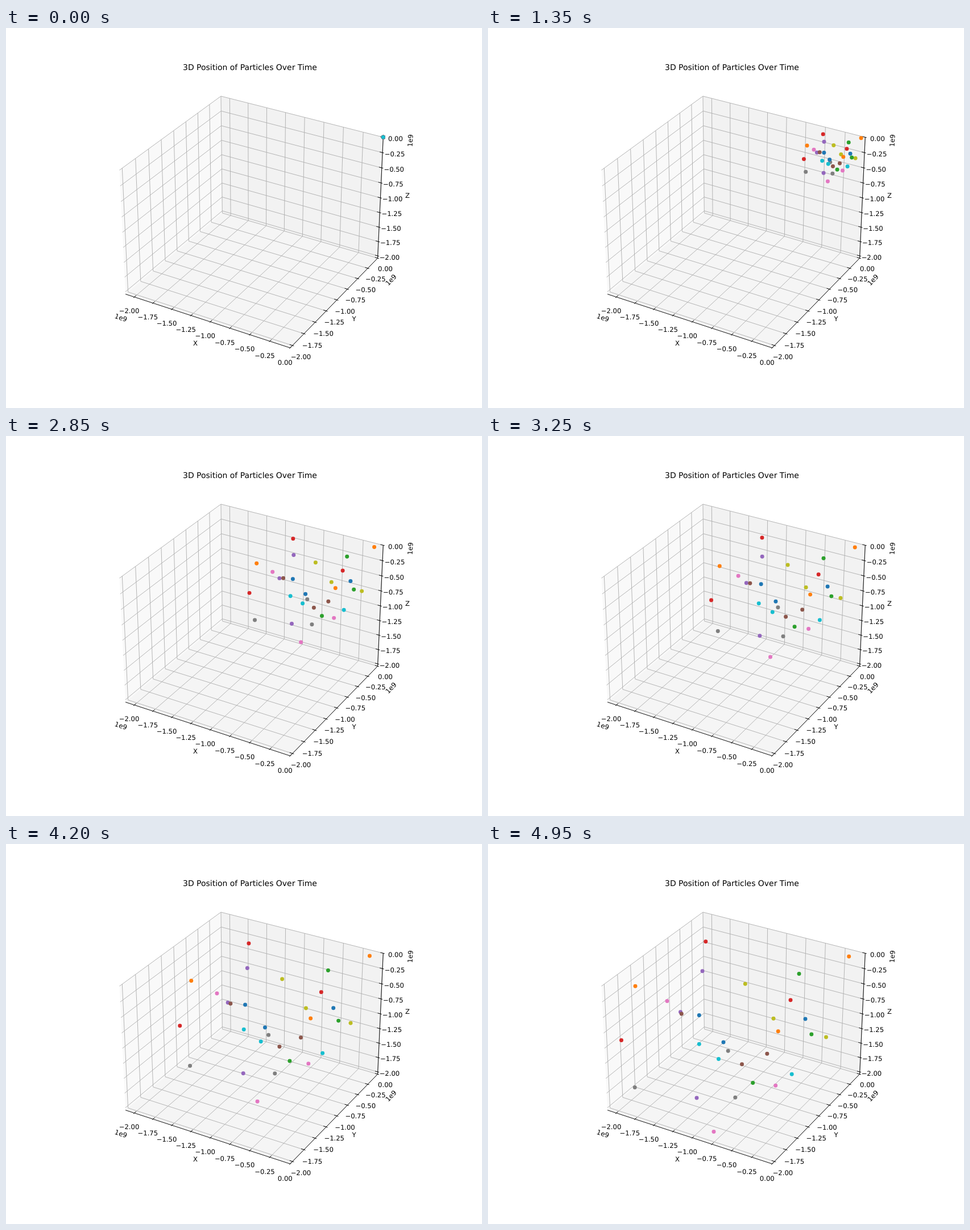
Recreate the animation shown at these times as an HTML page. Size 837 by 669 pixels, loop 5000 ms.

```html
<!DOCTYPE html>
<html lang="en">
<head>
<meta charset="utf-8">
<title>3D Position of Particles Over Time</title>
<style>
  html, body { margin: 0; width: 100%; height: 100%; overflow: hidden; background: #fff; }
  svg { display: block; width: 837px; height: 669px; }
  text {
    font: 11.62px "DejaVu Sans", sans-serif;
    text-anchor: middle;
    text-rendering: geometricPrecision;
  }
  .title { font-size: 13.94px; }
  .grid { stroke: #b0b0b0; stroke-width: .93; fill: none; }
  .axis { stroke: #000; stroke-width: .93; fill: none; }
</style>
</head>
<body>
<svg id="plot" viewBox="0 0 837 669"></svg>
<script>
const svg = document.getElementById('plot');

function add(tag, attrs, text) {
  const el = document.createElementNS('http://www.w3.org/2000/svg', tag);
  for (const key in attrs) el.setAttribute(key, attrs[key]);
  if (text) el.textContent = text;
  return svg.appendChild(el);
}

// Perspective camera: elevation 30°, azimuth -60°, box 4:4:3, distance 10.
const SIDE = 25 / 21, TALL = 25 / 28, ZOOM = 2787, CX = 435.9, CY = 330.9;
const C30 = Math.cos(Math.PI / 6);

function project([a, b, c]) {
  const x = (a - .5) * SIDE, y = (b - .5) * SIDE, z = (c - .5) * TALL;
  const k = ZOOM / (10 - (C30 / 2 * x - .75 * y + .5 * z));
  return [CX + k * (C30 * x + .5 * y), CY - k * (-.25 * x + C30 / 2 * y + C30 * z)];
}

const path = (pts, attrs) =>
  add('path', { d: 'M' + pts.map(p => project(p).map(v => v.toFixed(2))).join('L'), ...attrs });

const label = (text, x, y, angle = 0) =>
  add('text', { x, y, transform: `rotate(${angle} ${x} ${y})` }, text);

// Panes
path([[0, 0, 0], [0, 1, 0], [0, 1, 1], [0, 0, 1]], { fill: '#f9f9f9' });
path([[0, 1, 0], [1, 1, 0], [1, 1, 1], [0, 1, 1]], { fill: '#f2f2f2' });
path([[0, 0, 0], [1, 0, 0], [1, 1, 0], [0, 1, 0]], { fill: '#f5f5f5' });

const IN = 1 / 60, OUT = 1 / 120;
const axes = [
  { min: 2.12, pad: .052,
    grid: f => [[f, 0, 0], [f, 1, 0], [f, 1, 1]],
    line: [[0, 0, 0], [1, 0, 0]],
    tick: f => [[f, -OUT, 0], [f, IN, 0]],
    text: (f, e) => [f, -e, -e] },
  { min: 2.05, pad: .0485,
    grid: f => [[1, f, 0], [0, f, 0], [0, f, 1]],
    line: [[1, 0, 0], [1, 1, 0]],
    tick: f => [[1 + OUT, f, 0], [1 - IN, f, 0]],
    text: (f, e) => [1 + e, f, -e] },
  { min: 2.04, pad: .0485,
    grid: f => [[0, 0, f], [0, 1, f], [1, 1, f]],
    line: [[1, 1, 0], [1, 1, 1]],
    tick: f => [[1 + OUT, 1, f], [1 - IN, 1, f]],
    text: (f, e) => [1 + e, 1 + e, f] }
];
const values = Array.from({ length: 9 }, (_, i) => 2 - i / 4);

for (const ax of axes)
  for (const v of values) path(ax.grid(1 - v / ax.min), { class: 'grid' });

for (const ax of axes) {
  path(ax.line, { class: 'axis' });
  for (const v of values) {
    const f = 1 - v / ax.min;
    path(ax.tick(f), { class: 'axis' });
    const [x, y] = project(ax.text(f, ax.pad));
    label((v ? '\u2212' : '') + v.toFixed(2), x, y + 9.3);
  }
}

label('X', 333, 559);
label('Y', 612, 516.2);
label('Z', 706, 299);
label('1e9', 200.8, 514, 18);
label('1e9', 679.8, 446.4, -45.7);
label('1e9', 715, 198.3, -87.3);
add('text', { x: 429, y: 73.5, class: 'title' }, '3D Position of Particles Over Time');

// Per colour: end x, end y and perspective bend of three particles.
const groups = {
  '#1f77b4': [371.3, 301.5, -.12, 414, 349, -.105, 558, 308.1, -.115],
  '#ff7f0e': [259, 250.3, -.097, 510.2, 329.8, -.104, 634.7, 198, -.1],
  '#2ca02c': [465.7, 420.4, -.115, 568.8, 335, -.112, 547, 228.6, -.11],
  '#d62728': [234.5, 345.5, -.104, 382.8, 171.8, -.043, 532, 274.7, -.127],
  '#9467bd': [338.5, 295.7, -.056, 377, 223.7, -.099, 367, 447, -.125],
  '#8c564b': [340.3, 299, -.121, 446.5, 387.7, -.053, 490.8, 369.2, -.065],
  '#e377c2': [315, 276.5, -.067, 397, 506.4, -.123, 505.7, 425.2, -.1],
  '#7f7f7f': [422.2, 364.2, -.085, 258.2, 428.6, -.072, 434.8, 446.3, -.104],
  '#bcbd22': [502, 307.2, -.046, 452.3, 246.2, -.048, 594.5, 340, -.11],
  '#17becf': [371.3, 352.3, -.067, 405.5, 378.5, -.1, 534.2, 405.2, -.15]
};
const [X0, Y0] = project([1, 1, 1]);
const dots = [];
for (const fill in groups) {
  const g = groups[fill];
  for (let i = 0; i < g.length; i += 3)
    dots.push({ fill, x: g[i], y: g[i + 1], bend: g[i + 2] });
}
// Nearer particles are painted last.
dots.sort((p, q) => q.bend - p.bend);
for (const d of dots) d.el = add('circle', { r: 3.48, fill: d.fill });

const STEP = 50, COUNT = 100;
let shown = -1;

function draw() {
  const step = Math.floor(performance.now() / STEP) % COUNT;
  if (step !== shown) {
    shown = step;
    const s = step / (COUNT - 1);
    for (const d of dots) {
      const g = s * (1 + d.bend) / (1 + d.bend * s);
      d.el.setAttribute('cx', X0 + (d.x - X0) * g);
      d.el.setAttribute('cy', Y0 + (d.y - Y0) * g);
    }
  }
  requestAnimationFrame(draw);
}
draw();
</script>
</body>
</html>
```
